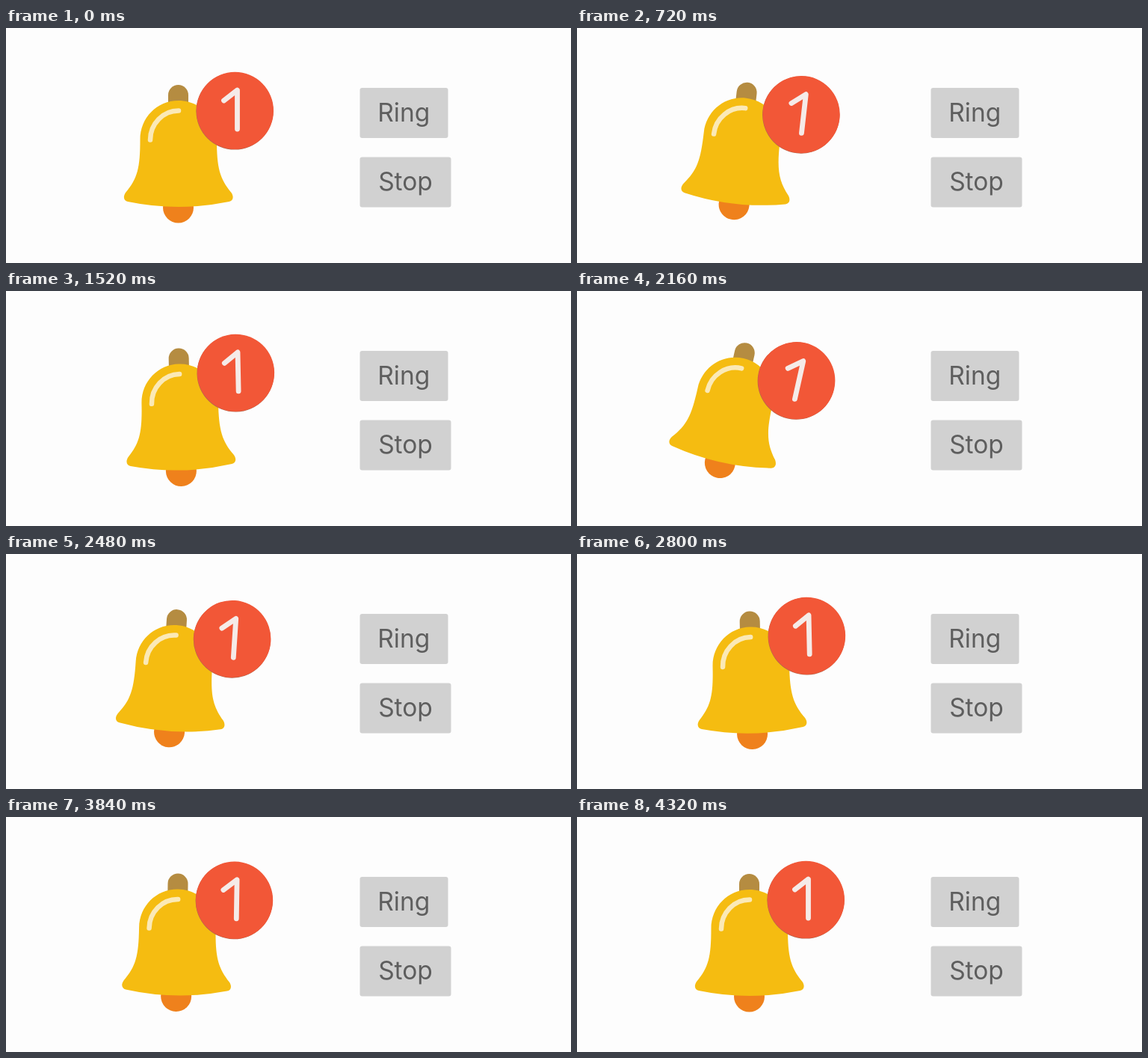
Recreate the animation shown at these times as an HTML page. Size 756x314 px, loop 4880 ms.

```html
<!DOCTYPE html>
<html lang="en">
<head>
<meta charset="utf-8">
<title>Ringing bell</title>
<style>
  html, body { margin: 0; width: 100%; height: 100%; overflow: hidden; background: #fdfdfd; }
  svg { display: block; width: 756px; height: 314px; }
  text { font: 33.5px Inter, Roboto, sans-serif; fill: #5e5e5e; text-anchor: middle; }
  .button { fill: #d1d1d1; }
  .line { fill: none; stroke-linecap: round; stroke-linejoin: round; }
</style>
</head>
<body>
<svg viewBox="0 0 756 314">
  <g id="bell">
    <rect x="217" y="76" width="27" height="40" rx="13.5" fill="#b58c41"/>
    <circle cx="230.5" cy="240" r="20.5" fill="#ef811c"/>
    <path fill="#f5bc11" d="M230.7 97 C202 97 179.500 120 179.500 149 C179.500 187 176 201 160 220
      C156 226 158 231 163 232 Q230.700 246 298.500 232 C303.500 231 305.500 226 301.500 220
      C286 201 282 187 282 149 C282 120 259.500 97 230.700 97Z"/>
    <path class="line" stroke="#fbe9b6" stroke-width="6.5" d="M193 149.500 A38 39 0 0 1 231 110.500"/>
    <circle cx="306" cy="111" r="51.6" fill="#b5654c"/>
    <circle cx="306.4" cy="110.400" r="51.6" fill="#f25737"/>
    <path class="line" stroke="#f5ebe8" stroke-width="6.800" d="M291.500 97 L309.500 83 V135"/>
  </g>
  <rect class="button" x="473.5" y="80" width="118" height="67" rx="3"/>
  <rect class="button" x="473.5" y="172.500" width="122" height="67" rx="3"/>
  <text x="532.300" y="124.500">Ring</text>
  <text x="534.500" y="216.500">Stop</text>
</svg>
<script>
  const LOOP = 4880, STEP = 80;
  const KEYS = [0, 15, -10, 5, -5, 0];                       // degrees, evenly spaced in one ring
  const RINGS = [[640, 1565], [1968, 2845], [3250, 4115]];   // start and end in ms
  const bell = document.getElementById('bell');

  function swing(p) {
    const x = p * (KEYS.length - 1);
    const i = Math.floor(x);
    return KEYS[i] + (KEYS[i + 1] - KEYS[i]) * (x - i);
  }

  function angleAt(time) {
    const ring = RINGS.find(([from, to]) => time >= from && time < to);
    return ring ? swing((time - ring[0]) / (ring[1] - ring[0])) : 0;
  }

  const start = performance.now();

  function draw() {
    const time = (performance.now() - start) % LOOP;
    const held = Math.floor(time / STEP) * STEP;
    bell.setAttribute('transform', `rotate(${angleAt(held).toFixed(2)} 258 58)`);
    requestAnimationFrame(draw);
  }
  draw();
</script>
</body>
</html>
```
